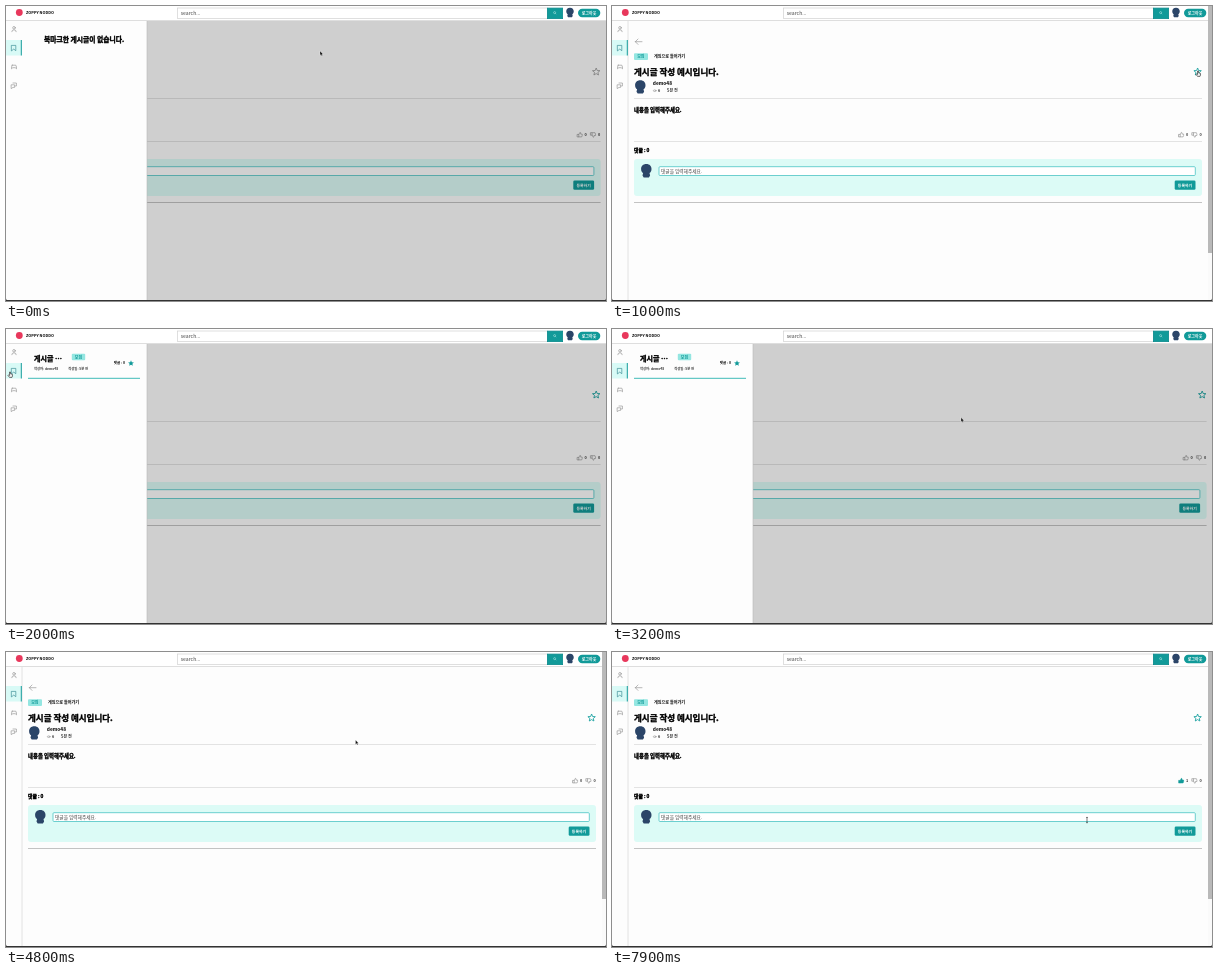
An HTML page for the animation above (8000 ms loop, 600 by 295 pixels).

```html
<!DOCTYPE html>
<html>
<head>
<meta charset="utf-8">
<title>Bookmark and like</title>
<style>
  html, body { margin: 0; width: 100%; height: 100%; overflow: hidden; background: #fdfdfd; }
  svg { display: block; }
  text { font-family: "Noto Sans CJK KR", "Noto Sans CJK", sans-serif; font-weight: 900; fill: #000; }
  .heavy { stroke: #000; stroke-width: .35; }
  .plain { font-weight: 400; fill: #444; }
  .mid { font-weight: 700; fill: #333; }
  .teal { fill: #119a99; }
  .white { fill: #fff; }
  .icon { fill: none; stroke: #8a8a8a; stroke-width: .6; stroke-linejoin: round; stroke-linecap: round; }
  .rule { stroke: #dedede; stroke-width: .8; }
  .avatar { fill: #2b4568; }
  .star { fill: none; stroke: #8a8a8a; stroke-width: .7; stroke-linejoin: round; }
  .star.on { stroke: #1ea3a2; stroke-width: .9; }
  .thumb.on { fill: #119a99; stroke: #119a99; }
</style>
</head>
<body>
<svg width="600" height="295" viewBox="0 0 600 295">
  <defs>
    <path id="starShape" d="M0-3.7 1-1.2 3.7-1 1.7.7 2.3 3.3 0 1.9-2.3 3.3-1.7.7-3.7-1-1-1.2Z"/>
    <path id="thumbShape" d="M-2.4-.3H-1.1V2.2H-2.4ZM-1.1-.2 .1-2.4Q1-2.4 .8-.6H2.3Q2.6 .7 1.8 2.2H-1.1"/>
    <path id="avatarShape" d="M0-6.8C3.4-6.8 5.2-4.6 5.2-1.8 5.2.4 4.4 1.6 3.2 2.2L3.8 4.8 2.6 6.6H-2.6L-3.8 4.8-3.2 2.2C-4.4 1.6-5.2.4-5.2-1.8-5.2-4.6-3.4-6.8 0-6.8Z"/>
  </defs>
  <rect width="600" height="295" fill="#fdfdfd"/>

  <g id="content">
    <path class="icon" stroke-width=".7" d="M30 35.7H23.3M26 33 23.3 35.7 26 38.4"/>
    <rect x="22" y="47.3" width="14" height="6.8" rx="1" fill="#94e6e1"/>
    <text class="teal" x="25.2" y="52.2" font-size="4">모집</text>
    <text x="42" y="52.2" font-size="4.1">게임으로 들어가기</text>
    <text class="heavy" x="22" y="68.7" font-size="8.5">게시글 작성 예시입니다.</text>
    <use id="star" class="star" href="#starShape" x="585.6" y="65.7"/>
    <use class="avatar" href="#avatarShape" x="28.3" y="81"/>
    <text x="40.8" y="79.2" font-size="4.8">demo48</text>
    <ellipse class="icon" cx="42.7" cy="84.7" rx="1.4" ry=".8"/>
    <text class="mid" x="46" y="86" font-size="3.8">6</text>
    <text class="mid" x="55" y="86.1" font-size="4.1">5분 전</text>
    <path class="rule" d="M22 92.5H590M22 135.5H590"/>
    <text class="heavy" x="22" y="106.2" font-size="5.4">내용을 입력해주세요.</text>
    <use id="like" class="icon thumb" href="#thumbShape" x="569.3" y="128.7"/>
    <text id="likes" class="mid" x="573.9" y="130.2" font-size="3.8">0</text>
    <use class="icon" href="#thumbShape" transform="translate(582.6 128.9) scale(1 -1)"/>
    <text class="mid" x="587.4" y="130.2" font-size="3.8">0</text>
    <text class="heavy" x="22" y="145.6" font-size="4.8">댓글 : 0</text>
    <rect x="22" y="153" width="568" height="37" rx="3" fill="#dcfbf6"/>
    <use class="avatar" href="#avatarShape" x="34.3" y="164.8"/>
    <rect x="47" y="160.7" width="536.3" height="8.8" rx="1" fill="#fff" stroke="#4cc5c4" stroke-width=".8"/>
    <text id="placeholder" class="plain" x="49" y="166.7" font-size="4.7">댓글을 입력해주세요.</text>
    <rect x="562.7" y="174.5" width="20.8" height="9.3" rx="1.3" fill="#119a99"/>
    <text class="white" x="565.8" y="180.7" font-size="3.9">등록하기</text>
    <path stroke="#bdbdbd" stroke-width=".9" d="M22 196.5H590"/>
  </g>

  <path id="sideEdge" d="M16 15V294" stroke="#e2e2e2" stroke-width="1"/>

  <g id="drawer">
    <rect y="14" width="600" height="281" fill="#000" fill-opacity=".185"/>
    <rect y="14" width="141" height="281" fill="#fdfdfd"/>
    <path d="M141 15V294" stroke="#bbb" stroke-width=".6"/>
    <text id="empty" class="heavy" x="38" y="36.3" font-size="6.8">북마크한 게시글이 없습니다.</text>
    <g id="saved">
      <text class="heavy" x="28" y="31.7" font-size="7">게시글 ⋯</text>
      <rect x="65.8" y="24.7" width="13.4" height="6.6" rx="1" fill="#94e6e1"/>
      <text class="teal" x="68.8" y="29.5" font-size="4">모집</text>
      <text x="107.8" y="35.3" font-size="3.5">댓글 : 0</text>
      <use href="#starShape" transform="translate(125 34.2) scale(.8)" fill="#119a99"/>
      <text class="mid" x="28" y="41.2" font-size="3.3">작성자: demo48</text>
      <text class="mid" x="62.3" y="41.2" font-size="3.3">작성일: 5분 전</text>
      <path d="M22 49.3H134" stroke="#2bb5b0" stroke-width=".9"/>
    </g>
  </g>

  <rect y="34" width="15.5" height="15.5" fill="#d8faf6"/>
  <path d="M15.3 34V49.5" stroke="#169c9b" stroke-width="1"/>
  <g class="icon">
    <circle cx="8" cy="21.8" r="1.3"/>
    <path d="M5.8 25.7Q5.9 23.8 8 23.8T10.2 25.7"/>
    <path stroke="#287f88" d="M5.7 39.4H9.8V44.7L7.75 43.1 5.7 44.7Z"/>
    <path d="M6.2 59.2H9.8Q10.8 61 10.5 62.8L9.2 61.7H6.8L5.5 62.8Q5.2 61 6.2 59.2Z"/>
    <path d="M7 77H10.4V80H9.3M5.5 78.8H8.6V81.4H7L5.5 82.4Z"/>
  </g>

  <rect width="600" height="14" fill="#fff"/>
  <path d="M0 14.5H600" stroke="#dedede" stroke-width="1"/>
  <circle cx="13.3" cy="6.5" r="3.4" fill="#e8385c"/>
  <text x="20" y="8.4" font-size="3.9">ZOPPY NODDO</text>
  <rect x="171.5" y="2" width="370" height="10.5" fill="#fff" stroke="#d2d2d2" stroke-width=".7"/>
  <text class="plain" x="174.7" y="9" font-size="5.1">search...</text>
  <rect x="541.4" y="2.1" width="15.2" height="10.5" fill="#119a99" stroke="#0c8b8e" stroke-width=".8"/>
  <g fill="none" stroke="#c5eeec" stroke-width=".5">
    <circle cx="548.6" cy="6.6" r="1"/>
    <path d="M549.3 7.3 550.2 8.2"/>
  </g>
  <use class="avatar" href="#avatarShape" transform="translate(564 6.6) scale(.72)"/>
  <rect x="572" y="2.8" width="22.3" height="8.4" rx="4.2" fill="#119a99"/>
  <text class="white" x="575.7" y="8.5" font-size="4">로그아웃</text>

  <g id="scrollbar">
    <rect x="596" width="4" height="295" fill="#fafafa"/>
    <rect x="596" width="4" height="247" fill="#b9b9b9"/>
  </g>
  <path d="M0 292.5Q0 294 1.5 294H598.5Q600 294 600 292.5V295H0Z" fill="#333"/>

  <g id="cursor">
    <path data-kind="arrow" d="M0 0V4.4L1 3.5 1.7 5 2.5 4.6 1.8 3.2H3.1Z" fill="#111" stroke="#fff" stroke-width=".3"/>
    <path data-kind="hand" d="M-.5 0Q0-.6.5 0V1.8L2.4 2.3Q2.9 4 2 5.4H-.5L-2 3.4-1.5 2.9-.5 3.5Z" fill="#eee" stroke="#222" stroke-width=".6"/>
    <path data-kind="beam" d="M-1-2.7Q0-2.7 0-2 0-2.7 1-2.7M0-2V2.2M-1 2.8Q0 2.8 0 2.2 0 2.8 1 2.8" fill="none" stroke="#222" stroke-width=".6"/>
  </g>
</svg>
<script>
  const LOOP = 8000, STEP = 100;
  const OPEN_EMPTY = [0, 100], OPEN_SAVED = [2000, 3500];
  const STAR_AT = 1000, LIKE_AT = 6000;

  // time, x, y of the pointer
  const path = [
    [0, 314, 45], [100, 315, 45], [800, 586, 65], [1100, 586, 65],
    [1800, 4, 43], [2500, 4, 43], [3200, 349, 88.5], [3500, 349.5, 88],
    [4800, 349.5, 88], [5600, 569, 128.5], [5800, 570, 129],
    [6900, 570, 129], [7700, 472.5, 172], [7800, 475, 168], [LOOP, 475, 168]
  ];

  const $ = id => document.getElementById(id);
  const within = (t, [from, to]) => t >= from && t < to;
  const show = (el, on) => el.style.display = on ? '' : 'none';
  const ease = p => p * p * (3 - 2 * p);

  function pointerAt(t) {
    const i = path.findIndex(key => key[0] > t);
    const [t0, x0, y0] = path[i - 1], [t1, x1, y1] = path[i];
    const p = ease((t - t0) / (t1 - t0));
    return [x0 + (x1 - x0) * p, y0 + (y1 - y0) * p];
  }

  function pointerKind(x, y) {
    const near = (cx, cy) => Math.hypot(x - cx, y - cy) < 4.5;
    if (x < 15 || near(586, 66) || near(569.5, 128.7)) return 'hand';
    return x > 47 && x < 583 && y > 160 && y < 170 ? 'beam' : 'arrow';
  }

  function render(t) {
    const empty = within(t, OPEN_EMPTY), saved = within(t, OPEN_SAVED);
    const open = empty || saved;
    show($('drawer'), open);
    show($('empty'), empty);
    show($('saved'), saved);
    show($('scrollbar'), !open);
    show($('sideEdge'), !open);
    show($('placeholder'), !open);
    $('content').setAttribute('transform', `translate(${open ? 4.6 : 0} 0)`);
    $('star').classList.toggle('on', t >= STAR_AT);
    $('like').classList.toggle('on', t >= LIKE_AT);
    $('likes').textContent = t >= LIKE_AT ? 1 : 0;

    const [x, y] = pointerAt(t), kind = pointerKind(x, y);
    $('cursor').setAttribute('transform', `translate(${x} ${y})`);
    for (const shape of $('cursor').children) show(shape, shape.dataset.kind === kind);
  }

  const start = performance.now();
  function tick() {
    const t = (performance.now() - start) % LOOP;
    render(Math.floor(t / STEP) * STEP);
    requestAnimationFrame(tick);
  }
  tick();
</script>
</body>
</html>
```
